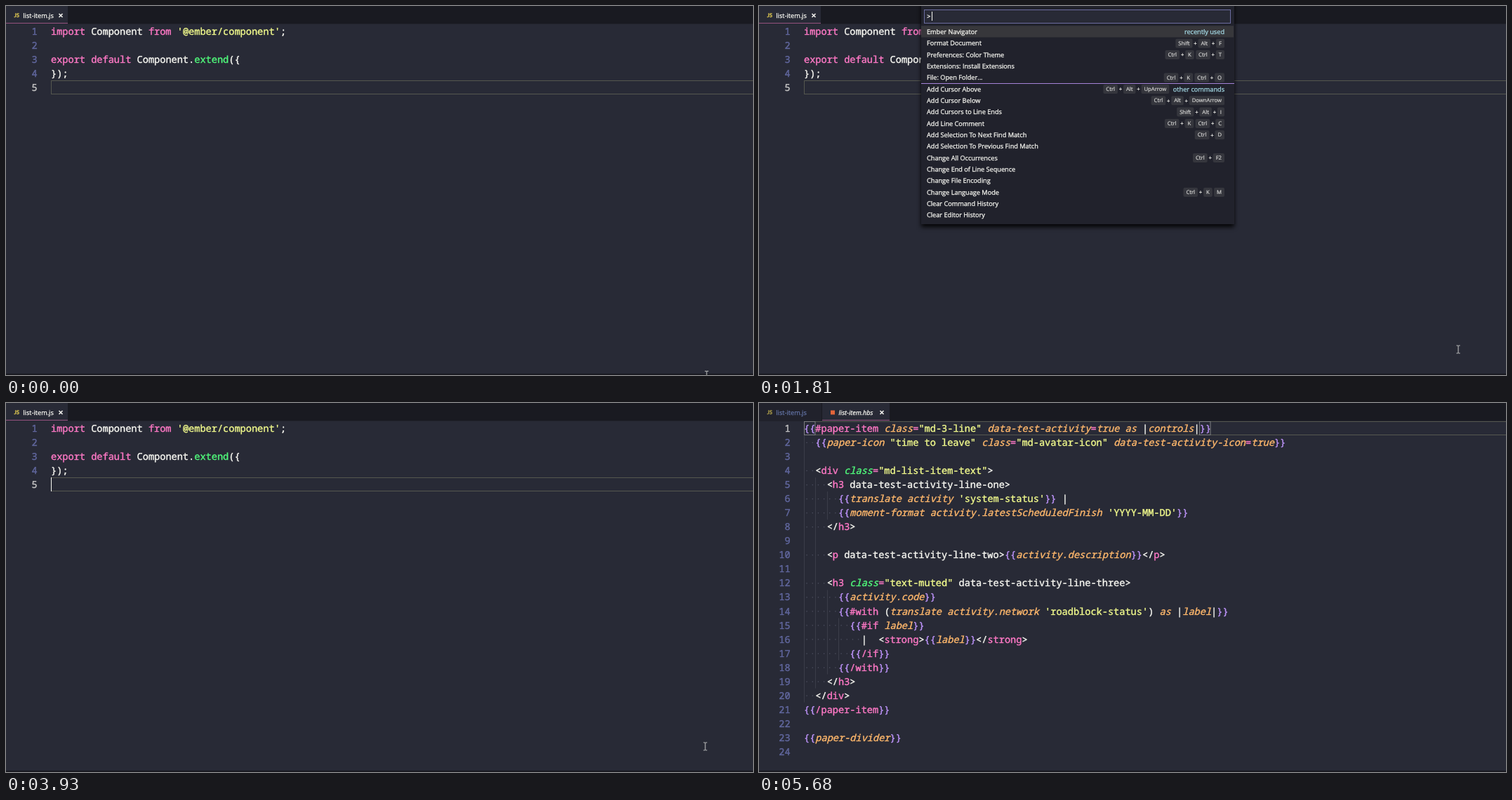
Recreate the animation shown at these times as an HTML page. Size 1064 px wide and 526 px high, loop 6020 ms.

```html
<!DOCTYPE html>
<html lang="en">
<head>
<meta charset="utf-8">
<title>Editor navigation</title>
<style>
  html, body { margin: 0; width: 100%; height: 100%; overflow: hidden; background: #282a36; }
  svg { display: block; width: 100%; height: 100%; }
  text { white-space: pre; text-rendering: geometricPrecision; stroke-width: .2; }
  .code { font: 500 13.617px "Noto Sans Mono", monospace; stroke-width: .4; }
  .ui { font: 9.17px "Open Sans", sans-serif; stroke-width: .28; }
  .path { font: 8.2px "Open Sans", sans-serif; }
  .key { font: 7.7px "Open Sans", sans-serif; }
  .badge { font: 700 7.8px Lato, sans-serif; }
  .it { font-style: italic; }
  .panel { filter: drop-shadow(0 4px 3px rgba(0, 0, 0, .9)); }
</style>
</head>
<body>
<svg id="stage" viewBox="0 0 1064 526"></svg>
<script>
const LOOP = 6020, CHAR = 8.17, LEFT = 64, PITCH = 20.04;
const FG = '#f8f8f2', DARK = '#21222c', BG = '#282a36';
const stage = document.getElementById('stage');
const pen = document.createElement('canvas').getContext('2d');

function add(parent, tag, attrs, content) {
  const node = document.createElementNS('http://www.w3.org/2000/svg', tag);
  for (const k in attrs) node.setAttribute(k, attrs[k]);
  if (content !== undefined) node.textContent = content;
  parent.appendChild(node);
  return node;
}
const group = (parent = stage, attrs = {}) => add(parent, 'g', attrs);
const box = (g, x, y, width, height, fill, more) =>
  add(g, 'rect', { x, y, width, height, fill, ...more });
const frame = (g, x, y, w, h, stroke) => box(g, x, y, w, h, 'none', { stroke });
const label = (g, cls, x, y, str, fill = FG, anchor = 'start') =>
  add(g, 'text', { class: cls, x, y, fill, stroke: fill, 'text-anchor': anchor }, str);
const show = (node, on) => node.setAttribute('visibility', on ? 'visible' : 'hidden');
const inside = (t, ...spans) => spans.some(([a, b]) => t >= a && t < b);

function width(font, str) {
  pen.font = font;
  return pen.measureText(str).width;
}

// "~" plus a letter switches the token colour
const INK = {
  p: '#ff79c6', w: FG, y: '#f1fa8c', G: '#50fa7b',
  g: '#50fa7b', o: '#ffb86c', v: '#bd93f9'
};

function codeLine(g, n, src) {
  let col = 0;
  for (const part of src.split('~').slice(1)) {
    const k = part[0], str = part.slice(1);
    const skip = str.length - str.trimStart().length;
    const cls = 'go'.includes(k) ? 'code it' : 'code';
    if (str.trim()) label(g, cls, LEFT + (col + skip) * CHAR, 41 + n * PITCH, str.trim(), INK[k]);
    col += str.length;
  }
}

function editor(lines, active) {
  const g = group();
  lines.forEach(([indent, body], n) => {
    label(g, 'code', 44.6, 41 + n * PITCH, n + 1, n === active ? '#c6c6c6' : '#6268a0', 'end');
    for (let c = 0; c < indent; c++)
      add(g, 'circle', { cx: LEFT + (c + .5) * CHAR, cy: 36.5 + n * PITCH, r: .75, fill: '#505263' });
    if (body) codeLine(g, n, '~w' + ' '.repeat(indent) + body);
  });
  frame(g, 64.5, 26.5 + Math.round(active * PITCH), 1010, 19, '#55574f');
  return g;
}

function closeMark(g, x) {
  add(g, 'path', { d: `M${x - 2.5} 11l5 5m0-5l-5 5`, stroke: FG, 'stroke-width': 1.5 });
}

function activeTab(g, x, w) {
  box(g, x, 0, w, 26, BG);
  box(g, x, 24, w, 1, '#ff79c6', { opacity: .5 });
}

box(stage, 0, 0, 1064, 526, BG);
box(stage, 0, 0, 1064, 25.5, '#191a21');

// Component file
const js = group();
activeTab(js, 0, 88);
label(js, 'badge', 11.5, 16.4, 'JS', '#e5cd52');
label(js, 'ui', 24.3, 17, 'list-item.js');
closeMark(js, 78);
js.appendChild(editor([
  [0, "~pimport ~wComponent ~pfrom ~y'@ember/component'~w;"],
  [0, ''],
  [0, '~pexport default ~wComponent.~Gextend~w({'],
  [0, '~w});'],
  [0, '']
], 4));
const jsCaret = box(js, 64, 106, 1, 20, FG);

// Template file
const hbs = group();
box(hbs, 0, 0, 89, 25.5, DARK);
label(hbs, 'badge', 11.5, 16.4, 'JS', '#b5a54c');
label(hbs, 'ui', 24.3, 17, 'list-item.js', '#6272a4');
activeTab(hbs, 90, 96);
box(hbs, 102, 10.5, 6, 6, '#e3653a');
label(hbs, 'ui it', 113.5, 17, 'list-item.hbs');
closeMark(hbs, 175);

// indent guides: column, first line, line count
for (const [c, from, n] of [[0, 1, 19], [2, 4, 15], [4, 5, 2], [4, 12, 6], [6, 14, 3]])
  box(hbs, Math.round(LEFT + c * CHAR), 26 + from * PITCH, 1, n * PITCH, '#3b3d49');

hbs.appendChild(editor([
  [0, '~v{{~p#paper-item ~oclass~p=~y"md-3-line" ~odata-test-activity~p=~otrue as ~w|~ocontrols~w|~v}}'],
  [2, '~v{{~opaper-icon ~y"time to leave" ~oclass~p=~y"md-avatar-icon" ~odata-test-activity-icon~p=~otrue~v}}'],
  [0, ''],
  [2, '~w<~pdiv ~gclass~p=~y"md-list-item-text"~w>'],
  [4, '~w<~ph3 ~wdata-test-activity-line-one>'],
  [6, "~v{{~otranslate activity ~y'system-status'~v}} ~w|"],
  [6, "~v{{~omoment-format activity.latestScheduledFinish ~y'YYYY-MM-DD'~v}}"],
  [4, '~w</~ph3~w>'],
  [0, ''],
  [4, '~w<~pp ~wdata-test-activity-line-two>~v{{~oactivity.description~v}}~w</~pp~w>'],
  [0, ''],
  [4, '~w<~ph3 ~gclass~p=~y"text-muted" ~wdata-test-activity-line-three>'],
  [6, '~v{{~oactivity.code~v}}'],
  [6, "~v{{~p#with ~w(~otranslate activity.network ~y'roadblock-status'~w) ~oas ~w|~olabel~w|~v}}"],
  [8, '~v{{~p#if ~olabel~v}}'],
  [10, '~w|  <~pstrong~w>~v{{~olabel~v}}~w</~pstrong~w>'],
  [8, '~v{{~p/if~v}}'],
  [6, '~v{{~p/with~v}}'],
  [4, '~w</~ph3~w>'],
  [2, '~w</~pdiv~w>'],
  [0, '~v{{~p/paper-item~v}}'],
  [0, ''],
  [0, '~v{{~opaper-divider~v}}'],
  [0, '']
], 0));
frame(hbs, 64.5, 26.5, 15.5, 19, '#7d7e80');
frame(hbs, 627.5, 26.5, 15.5, 19, '#7d7e80');
const hbsCaret = box(hbs, 64, 26, 1, 20, FG);

box(stage, 0, 524, 1064, 2, '#191a21');

function panel(bottom, rowTop, rowHeight) {
  const g = group();
  box(g, 231, -10, 446, bottom + 10, DARK, { class: 'panel' });
  box(g, 235.5, 5.5, 436, 19, BG, { stroke: '#6c6da0' });
  box(g, 231, rowTop, 445, rowHeight, '#37373b');
  return g;
}

// Draws "Ctrl+K Ctrl+T" from the right edge leftwards
function keys(g, right, base, combo) {
  let x = right;
  combo.split(' ').reverse().forEach((chord, i) => {
    if (i) x -= 2.3;
    chord.split('+').reverse().forEach((key, j) => {
      if (j) {
        label(g, 'key', x - 4, base - .3, '+', FG, 'middle');
        x -= 8;
      }
      const w = width('7.7px "Open Sans", sans-serif', key) + 8;
      x -= w;
      box(g, x, base - 9.7, w, 13, '#35363d', { rx: 2 });
      label(g, 'key', x + 4, base - .6, key, '#d6d6d4');
    });
  });
}

const palette = panel(311, 28.3, 16.3);
label(palette, 'ui', 239.3, 18, '>');
[
  ['Ember Navigator', '', 'recently used'],
  ['Format Document', 'Shift+Alt+F'],
  ['Preferences: Color Theme', 'Ctrl+K Ctrl+T'],
  ['Extensions: Install Extensions'],
  ['File: Open Folder...', 'Ctrl+K Ctrl+O'],
  ['Add Cursor Above', 'Ctrl+Alt+UpArrow', 'other commands'],
  ['Add Cursor Below', 'Ctrl+Alt+DownArrow'],
  ['Add Cursors to Line Ends', 'Shift+Alt+I'],
  ['Add Line Comment', 'Ctrl+K Ctrl+C'],
  ['Add Selection To Next Find Match', 'Ctrl+D'],
  ['Add Selection To Previous Find Match'],
  ['Change All Occurrences', 'Ctrl+F2'],
  ['Change End of Line Sequence'],
  ['Change File Encoding'],
  ['Change Language Mode', 'Ctrl+K M'],
  ['Clear Command History'],
  ['Clear Editor History']
].forEach(([name, combo, note], i) => {
  const base = 40 + i * 16.33;
  label(palette, 'ui', 239, base, name);
  let right = 663;
  if (note) {
    label(palette, 'ui', right, base, note, '#a3d8e4', 'end');
    right -= width('9.17px "Open Sans", sans-serif', note) + 5.5;
  }
  if (combo) keys(palette, right, base, combo);
});
box(palette, 231, 110, 446, 1, '#a583d8');
const paletteCaret = box(palette, 246, 8, 1, 13, FG);

const picker = panel(67.5, 30.3, 16);
[
  ['Navigate to the Associated Template', 399.3,
    'c:\\workspace\\prev-frontend\\app\\templates\\components\\activities\\list...'],
  ['Navigate to the Generated Test', 375.7,
    'c:\\workspace\\prev-frontend\\tests\\integration\\components\\activities\\list-ite...']
].forEach(([name, x, path], i) => {
  const base = 41.6 + i * 16.4;
  label(picker, 'ui', 239, base, name);
  label(picker, 'path', x, base, path, '#a9aaad');
});
const pickerCaret = box(picker, 239, 9, 1, 13, FG);

const mouse = add(stage, 'path', {
  d: 'M-2.5-5.5h2l.5.5.5-.5h2M0-5V5M-2.5 5.5h2L0 5l.5.5h2',
  fill: 'none', stroke: '#c9cac8'
});

// The pointer enters from below, rests, then leaves past the bottom edge
function pointer(t) {
  if (t < 5180) {
    const k = t < 40 ? 0 : Math.min(4, Math.floor((t - 40) / 43.3) + 1);
    const p = 1 - (1 - k / 4) ** 2;
    return [998 - 2 * p, 526 - 36.5 * p];
  }
  const p = Math.min(1, (Math.floor((t - 5180) / 55) + 1) / 10);
  return [996 + 41 * p, 489.5 + 44 * p * p];
}

function draw(t) {
  const inTemplate = t >= 4030;
  show(js, !inTemplate);
  show(hbs, inTemplate);
  show(palette, inside(t, [870, 1890]));
  show(picker, inside(t, [1890, 3930]));
  show(jsCaret, inside(t, [83, 600], [3930, 4030]));
  show(hbsCaret, inside(t, [4030, 4490], [4950, 5455]));
  show(paletteCaret, inside(t, [870, 1350], [1810, 1890]));
  show(pickerCaret, inside(t, [1890, 2400], [2910, 3390], [3900, 3930]));
  const [x, y] = pointer(t);
  mouse.setAttribute('transform', `translate(${x.toFixed(1)} ${y.toFixed(1)})`);
}

const start = performance.now();
function tick() {
  draw((performance.now() - start) % LOOP);
  requestAnimationFrame(tick);
}
tick();
</script>
</body>
</html>
```
